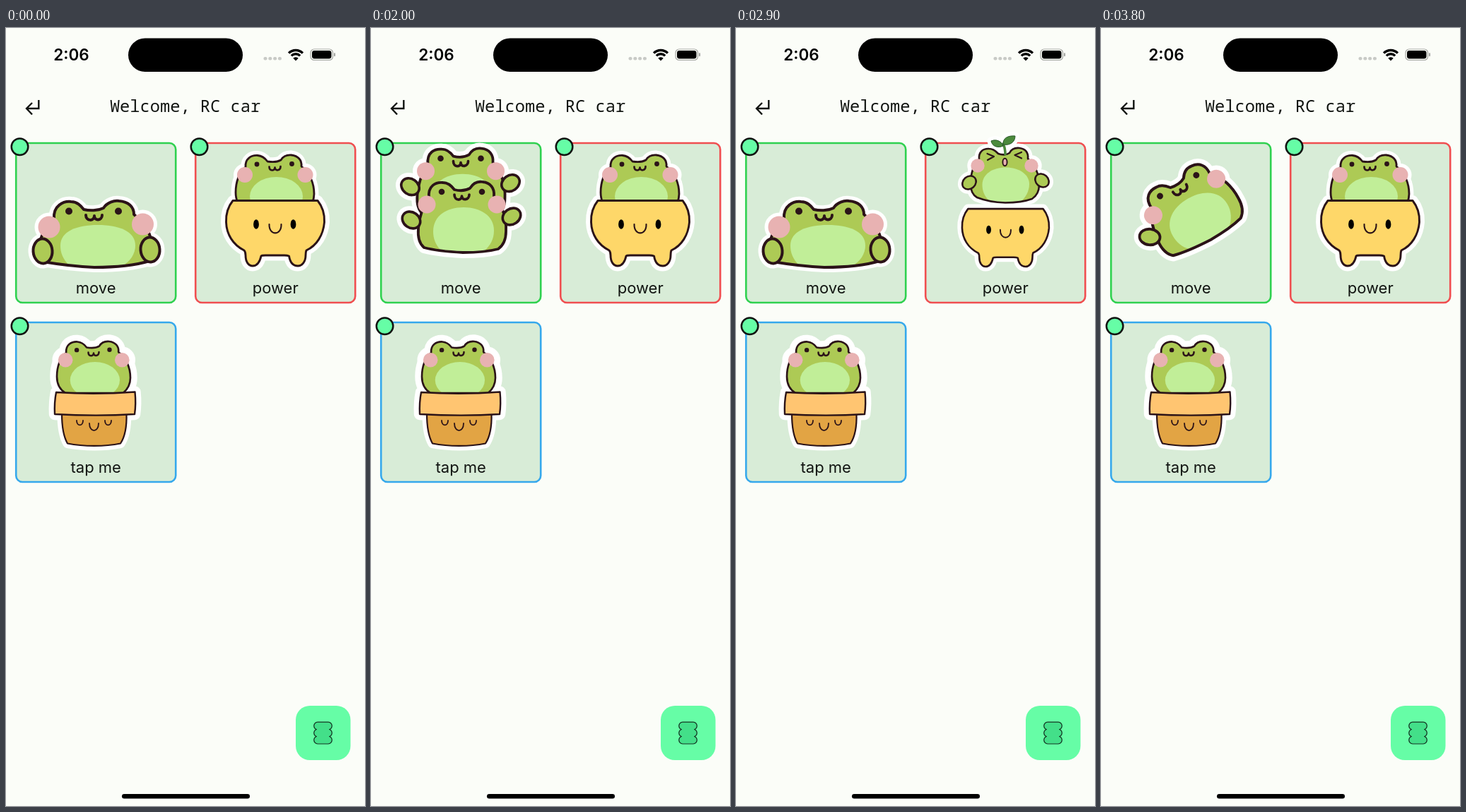
Recreate the animation shown at these times as an HTML page with a canvas. Size 508 px wide and 1102 px high, loop 3.85 s.

```html
<!DOCTYPE html>
<html lang="en">
<head>
<meta charset="utf-8">
<title>Frog remote</title>
<style>
html, body { margin: 0; width: 100%; height: 100%; overflow: hidden; background: #fbfdf8; }
canvas { display: block; width: 508px; height: 1102px; }
</style>
</head>
<body>
<canvas id="stage"></canvas>
<script>
const W = 508, H = 1102, LOOP = 3850;
const canvas = document.getElementById('stage');
const ctx = canvas.getContext('2d');
const dpr = window.devicePixelRatio || 1;
canvas.width = W * dpr;
canvas.height = H * dpr;

const INK = '#2b1318', SKIN = '#adca55', BELLY = '#c1ee98', BLUSH = '#e8b2b2',
      MINT = '#66fda6', LEAF = '#4b8a3c', BLACK = '#111411';

// Shapes: { p: path, fill, lw: outline width, ink: outline colour }
const shape = (d, fill, lw = 0, ink = INK) => ({ p: new Path2D(d), fill, lw, ink });
function oval(x, y, rx, ry, fill, lw = 0, deg = 0) {
  const p = new Path2D();
  p.ellipse(x, y, rx, ry, deg * Math.PI / 180, 0, Math.PI * 2);
  return { p, fill, lw, ink: INK };
}
const dot = (x, y, r, fill = INK) => oval(x, y, r, r, fill);
const line = (d, lw, ink) => shape(d, null, lw, ink);
// Fill, details, then the outline on top of them
const outlined = (d, lw, ...inner) => [shape(d, SKIN), ...inner, line(d, lw)];

const crouch = [
  ...outlined('M48 302C52 288 60 280 68 271C66 251 82 245 92 246C101 246 106 252 110 257C118 259 130 259 138 255C143 247 153 244 160 245C173 246 181 253 181 264C190 272 203 285 205 300L203 330C180 337 150 339 125 339C100 338 70 334 52 331Z', 4,
    shape('M90 337C80 327 77 318 77 308C77 288 100 279 130 279C160 279 183 288 183 308C183 320 176 330 165 337C140 340 115 340 90 337Z', BELLY)),
  dot(61, 282, 15.5, BLUSH), dot(193.5, 278, 15.5, BLUSH),
  dot(89, 259.5, 5), dot(159, 259.5, 5),
  line('M113 265C113 274 125 274 125 266C125 274 136 273 136 265', 4),
  oval(52, 316, 13.5, 17.5, SKIN, 4, -4), oval(204, 314, 13.5, 17.5, SKIN, 4, -4)
];

const torso = [
  ...outlined('M82 241C80 223 92 218 102 219C110 219 115 225 118 229C126 231 133 231 140 227C145 219 152 217 158 218C169 219 175 227 174 238C186 252 192 268 191 288C191 301 187 308 180 313C165 317 148 318 130 318C110 317 90 315 75 311C68 305 66 295 67 284C68 268 73 254 82 241Z', 3.8,
    shape('M99 315C91 307 88 298 88 288C88 266 107 254 131 254C155 254 174 266 174 287C174 299 169 308 160 316C140 319 118 318 99 315Z', BELLY)),
  dot(79, 250, 12.5, BLUSH), dot(178, 250, 12.5, BLUSH),
  dot(100, 232, 4.3), dot(157, 232, 4.3),
  line('M118 236C118 245 128.5 245 128.5 238C128.5 245 139 244 139 236', 3.7)
];
const arms = [oval(57, 272, 13.5, 11, SKIN, 3.6, 35), oval(199, 267, 13.5, 11, SKIN, 3.6, -35)];
const waver = [...torso, ...arms];
const leanArm = [oval(69, 296, 14.5, 11.2, SKIN, 3.8, 5)];

const sitter = [
  ...outlined('M339 197C338 185 347 180 356 180.500C363 181 367 185 370 189C376 190 384 190 389 187C392 182 398 179.500 404 180C413 181 419 187 418 196C430 205 436 220 436 235C436 246 431 253 425 258L338 258C330 253 325 245 325 233C325 218 330 204 339 197Z', 2.8,
    oval(382.5, 238.5, 37.5, 27.5, BELLY)),
  dot(338, 208, 11, BLUSH), dot(423.5, 208, 11, BLUSH),
  dot(355, 193, 3.4), dot(404.5, 192.5, 3.4),
  line('M372.500 196.500C372.500 203 380.500 203 380.500 197.500C380.500 203 388.500 202.500 388.500 196', 2.7)
];

const bowl = [
  shape('M321 244.500L441 244.500C447 252 451 263 450.500 275C449 293 440 308 425 315C424 317 424 320 424 322C424 331 419 337 413 337C406 337 402 332 400.500 323C398 322 396 322 394 322L367 322C364 322 362 322 361 323C359 332 355 337 349 337C343 337 339 331 339 322C339 319 339 317 337 315C321 307 312 292 311.500 275C311 263 315 252 321 244.500Z', '#fed769', 2.9),
  oval(354, 278, 3.9, 6.8, '#000'), oval(406.5, 278, 3.9, 6.8, '#000'),
  line('M372.500 278C372 294.500 390 294.500 389.500 278', 2.1)
];

const sprout = [
  line('M381 179C381 173 380 168 378 164', 3.6, LEAF),
  shape('M378 167C370 171 362 167 361 160C368 157 376 160 378 167Z', LEAF, 1, '#2c5a2c'),
  shape('M378 165C377 156 385 152 395 153C395 162 387 167 378 165Z', LEAF, 1, '#2c5a2c')
];
const hopper = [
  ...outlined('M344 186C343 175 350 170.500 358 171C365 171 368 175 371 178C376 180 383 180 387 177C390 171 396 169.500 401 170C410 171 414 177 413 185C424 195 429 208 429 222C429 232 425 238 419 242C408 246 394 247.500 381 247.500C366 247 351 244 341 240C334 236 332 229 332 221C332 206 336 194 344 186Z', 2.6,
    shape('M358 244C351 238 348.500 230 348.500 222C348.500 207 363 197.500 382 197.500C400 197.500 415 207 415 221C415 231 410 240 403 246C388 248 370 247 358 244Z', BELLY)),
  dot(342, 195, 9.7, BLUSH), dot(418, 195, 9.7, BLUSH),
  line('M355.500 178L365 182L356 187M404 176L394.500 180L404 184.500', 2.2),
  oval(380.5, 190, 3.1, 5.3, BLUSH, 1.9),
  oval(330, 219, 10.5, 8.7, SKIN, 2.5, -42), oval(433, 216, 10.5, 8.7, SKIN, 2.5, 42),
  ...sprout
];

const planter = [
  shape('M79 546C79 563 81 578 87 588.500C110 593 140 593 162 588.500C169 578 171 563 170.500 546Z', '#e2a444', 2.2),
  line('M100 556C100 564.500 109 564.500 109 556M140 556C140 564.500 149 564.500 149 556M118 560C118 573.500 131 573.500 131 560', 1.8)
];
const rim = [shape('M71 516C108 518.500 150 518 182.500 515.500C183.500 526 183.500 537 182 547C150 549 105 549 69 547C68.500 537 69 526 71 516Z', '#ffc571', 2.4)];

function paint(parts) {
  for (const s of parts) {
    if (s.fill) { ctx.fillStyle = s.fill; ctx.fill(s.p); }
    if (s.lw) { ctx.strokeStyle = s.ink; ctx.lineWidth = s.lw; ctx.stroke(s.p); }
  }
}
function halo(parts, size) {
  ctx.fillStyle = ctx.strokeStyle = '#fff';
  for (const s of parts) {
    ctx.lineWidth = s.lw + size * 2;
    ctx.stroke(s.p);
    if (s.fill) ctx.fill(s.p);
  }
}
// Layers: [parts, halo size, placement]; every halo lies below every layer
function sticker(...layers) {
  for (const draw of [halo, paint]) {
    for (const [parts, size, place] of layers) {
      ctx.save();
      if (place) place();
      draw(parts, size);
      ctx.restore();
    }
  }
}
const place = (x, y, scale, deg, cx, cy) => () => {
  ctx.translate(x, y);
  ctx.rotate(deg * Math.PI / 180);
  ctx.scale(scale, scale);
  ctx.translate(-cx, -cy);
};

function round(x, y, w, h, r, fill, stroke, lw) {
  ctx.beginPath();
  ctx.roundRect(x, y, w, h, r);
  if (fill) { ctx.fillStyle = fill; ctx.fill(); }
  if (stroke) { ctx.strokeStyle = stroke; ctx.lineWidth = lw; ctx.stroke(); }
}
function text(str, x, y, font, color = BLACK) {
  ctx.font = font;
  ctx.fillStyle = color;
  ctx.textAlign = 'center';
  ctx.fillText(str, x, y);
}

function statusBar() {
  text('2:06', 92.5, 46, '600 22.5px Inter, sans-serif', '#000');
  round(173, 14.5, 162, 47.5, 23.75, '#000');
  for (let i = 0; i < 4; i++) round(364.5 + i * 6.8, 41, 5, 4.5, 2, '#c8cac6');

  ctx.save();
  ctx.lineCap = 'butt';
  ctx.strokeStyle = ctx.fillStyle = '#000';
  ctx.lineWidth = 3.4;
  const a = -Math.PI * 0.75, b = -Math.PI * 0.25;
  for (const r of [14, 8.7]) {
    ctx.beginPath();
    ctx.arc(410, 45.5, r, a, b);
    ctx.stroke();
  }
  ctx.beginPath();
  ctx.moveTo(410, 46.5);
  ctx.arc(410, 46.5, 5.3, a, b);
  ctx.fill();
  ctx.restore();

  round(431, 30, 31.5, 15.5, 5, null, '#a3a5a1', 1.2);
  round(433, 32, 27.5, 11.5, 3.4, '#000');
  round(464, 35.3, 2, 5, 1, '#a3a5a1');
}

function header() {
  ctx.save();
  ctx.lineCap = 'butt';
  ctx.lineJoin = 'miter';
  ctx.strokeStyle = BLACK;
  ctx.lineWidth = 2.4;
  ctx.stroke(new Path2D('M46.300 102V114H30M37 106L29 114L37 122.500'));
  ctx.restore();
  text('Welcome, RC car', 253.5, 119, '500 23.7px "Noto Sans Mono", monospace');
}

function card(x, y, color, label) {
  round(x, y, 226, 226, 9, '#d8ecd7', color, 2.6);
  text(label, x + 113, y + 213.2, '400 22px Inter, sans-serif');
}
function badge(x, y) {
  ctx.beginPath();
  ctx.arc(x, y, 11.8, 0, Math.PI * 2);
  ctx.fillStyle = MINT;
  ctx.fill();
  ctx.strokeStyle = BLACK;
  ctx.lineWidth = 2.5;
  ctx.stroke();
}

function actionButton() {
  round(410, 960, 77.5, 77, 20, MINT);
  const pills = [983.5, 993.5, 1003.5];
  for (const y of pills) round(436, y, 25, 10, 5, null, '#143322', 1.8);
  for (const y of pills) round(436.4, y + 0.3, 24.2, 9.6, 4.8, '#43df89');
  round(440, 990, 17, 18, 0, '#43df89');
}

function drawMove(mode) {
  if (mode === 'forward') {
    sticker([waver, 6, () => ctx.translate(-1.5, -47.3)], [waver, 6]);
  } else if (mode === 'left') {
    sticker([torso, 6, place(118.5, 239.5, 1.04, -30, 128.5, 250)], [leanArm, 6]);
  } else {
    sticker([crouch, 5]);
  }
}
function drawPower(on) {
  if (on) sticker([bowl, 6, place(381, 338, 0.885, 0, 380.5, 337)], [hopper, 5]);
  else sticker([sitter, 5], [bowl, 6]);
}
function drawTap() {
  sticker([sitter, 9, place(124, 444, 0.937, 0, 380.5, 180)], [planter, 5.5], [rim, 7]);
}

function render(t) {
  const move = t >= 3700 ? 'left' : t >= 2000 && t < 2600 ? 'forward' : 'rest';
  const power = t >= 2900 && t < 3450;

  ctx.setTransform(dpr, 0, 0, dpr, 0, 0);
  ctx.lineCap = ctx.lineJoin = 'round';
  ctx.fillStyle = '#fbfdf8';
  ctx.fillRect(0, 0, W, H);

  statusBar();
  header();
  card(14.2, 163, '#2fd14f', 'move');
  card(268.2, 163, '#f04e50', 'power');
  card(14.2, 417, '#35a8ec', 'tap me');
  drawMove(move);
  drawPower(power);
  drawTap();
  badge(19.5, 168.3);
  badge(273.5, 168.3);
  badge(19.5, 422.3);
  actionButton();
  round(164, 1085, 181, 6.5, 3.25, '#000');
}

const start = performance.now();
function tick() {
  render((performance.now() - start) % LOOP);
  requestAnimationFrame(tick);
}
tick();
</script>
</body>
</html>
```
